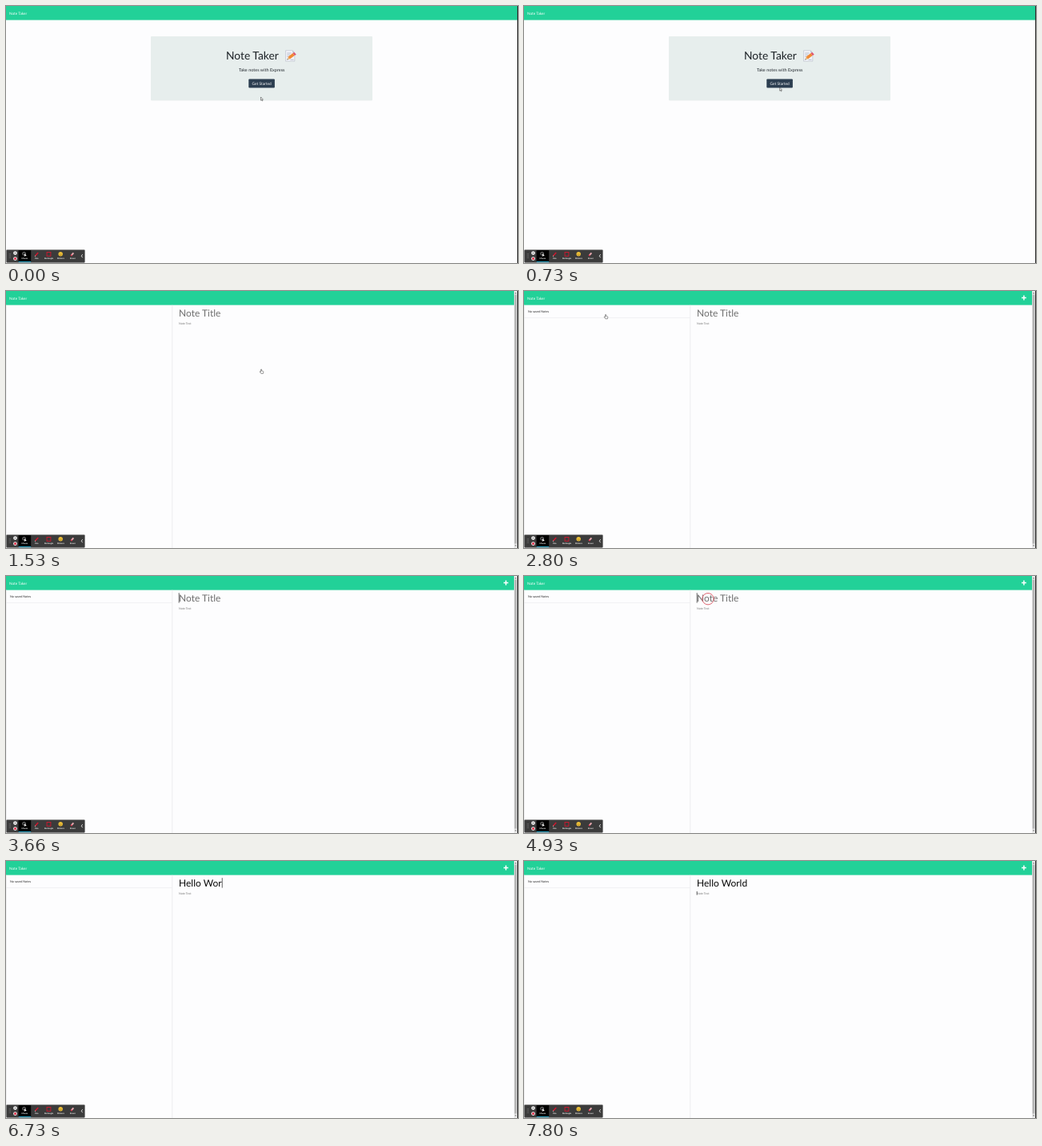
An HTML page for the animation above (8 s loop, 640 by 322 pixels).

```html
<!DOCTYPE html>
<html lang="en">
<head>
<meta charset="utf-8">
<title>Note Taker</title>
<style>
  html, body { margin: 0; width: 100%; height: 100%; overflow: hidden; background: #fdfdfe; }
  svg { display: block; width: 640px; height: 322px; }
  text { font-family: Lato, sans-serif; white-space: pre; text-rendering: geometricPrecision; }
  .mid { text-anchor: middle; }
  .tool { font-size: 2.5px; font-weight: 700; fill: #fff; text-anchor: middle; }
</style>
</head>
<body>
<svg viewBox="0 0 640 322" xmlns="http://www.w3.org/2000/svg">
  <rect width="640" height="322" fill="#fdfdfe"/>
  <rect width="640" height="17.6" fill="#22d198"/>
  <text x="4" y="10.6" font-size="4.65" fill="#fff">Note Taker</text>

  <g id="home">
    <rect x="181" y="38" width="277" height="80.4" rx="1" fill="#e7eeed"/>
    <text x="275" y="67" font-size="13.8" fill="#1c2126">Note Taker</text>
    <g id="memo">
      <path d="M349.6 55.8h8.6l2.6 2.6v10.8h-11.2z" fill="#f3f4fa" stroke="#a9afbd" stroke-width=".5"/>
      <path d="M358.2 55.8v2.6h2.6z" fill="#b9bfcd"/>
      <path d="M351.2 59h5.4M351.2 61.2h4M351.2 63.4h3M355.5 67.3h4" stroke="#8d97ad" stroke-width=".6"/>
      <path d="M351.4 67.4l1.2-3.6 2.2 2.6z" fill="#e9c48e"/>
      <path d="M352.6 63.8l5.9-4.7 2.3 2.8-6 4.5z" fill="#f08a35"/>
      <path d="M358.5 59.1l1.7-1.2 2.6 2.8-2 1.2z" fill="#e0506b"/>
      <path d="M351.4 67.4l.5-1.4.8.9z" fill="#333"/>
    </g>
    <text class="mid" x="319.7" y="81.8" font-size="5.5" fill="#23292f">Take notes with Express</text>
    <rect id="halo" x="302.6" y="90.8" width="34" height="12.4" rx="1.4" fill="#a3adb6"/>
    <rect id="btn" x="303.3" y="91.5" width="32.6" height="11" rx="1"/>
    <text class="mid" x="319.6" y="98.7" font-size="4.8" fill="#fff">Get Started</text>
  </g>

  <g id="notes">
    <path d="M207.8 17.6V322" stroke="#e6e8ea" stroke-width=".7"/>
    <path d="M.3 17.6V322" stroke="#dfe1e3" stroke-width=".6"/>
    <g id="list">
      <text x="5" y="27" font-size="3.75" fill="#222">No saved Notes</text>
      <path d="M0 33.6H207.6" stroke="#e9eaec" stroke-width=".6"/>
      <path d="M622 8.5h5.8M624.9 5.6v5.8" stroke="#fff" stroke-width="1.5"/>
    </g>
    <text id="title" x="216" y="31.8" font-size="12"></text>
    <text x="216" y="41.5" font-size="3.65" fill="#777">Note Text</text>
    <rect id="caret" width=".7" fill="#222"/>
    <circle id="ring" cx="230" cy="28.7" fill="none" stroke="#df6570" stroke-width="1"/>
    <rect x="635" width="4" height="322" fill="#e9e9e9"/>
    <rect x="635.6" y="4.6" width="2.8" height="312" fill="#b5b5b5"/>
    <path d="M636 3.2l1-1.4 1 1.4zM636 318.6l1 1.4 1-1.4z" fill="#555"/>
  </g>
  <rect x="639" width="1" height="322" fill="#2b2b2b"/>

  <g id="toolbar">
    <rect x=".5" y="305.6" width="98" height="15.8" rx=".8" fill="#3b3b3b" stroke="#777" stroke-width=".5"/>
    <path d="M4.2 310v6.6M5.4 310v6.6" stroke="#999" stroke-width=".6" stroke-dasharray=".7 1"/>
    <circle cx="11.5" cy="309.6" r="2.4" fill="#eee"/>
    <path d="M10.6 308.7l1.8 1.8M12.4 308.7l-1.8 1.8" stroke="#444" stroke-width=".5"/>
    <circle cx="11.5" cy="316.6" r="2.4" fill="#eee"/>
    <circle cx="11.5" cy="316.6" r="1.5" fill="#e0304a"/>
    <rect x="15.6" y="306" width="15.6" height="15" fill="#000"/>
    <rect x="15.6" y="320" width="15.6" height="1" fill="#2aa7c9"/>
    <circle cx="22.6" cy="310.3" r="1.9" fill="none" stroke="#ddd" stroke-width=".6"/>
    <path d="M22.6 309.8l3.2 3-1.4.1-1 1.2z" fill="#fff"/>
    <path d="M36.6 313l3.6-4" stroke="#d3172f" stroke-width="1.5"/>
    <path d="M35.9 313.9l.4-1.4.9.9z" fill="#eee"/>
    <rect x="51.1" y="308.5" width="4.8" height="4.8" fill="none" stroke="#d3172f" stroke-width=".9"/>
    <circle cx="68.2" cy="310.8" r="2.7" fill="#f3c53a"/>
    <path d="M66.7 311.4q1.5 1.7 3 0M67.2 309.6v.7M69.2 309.6v.7" fill="none" stroke="#6b4a10" stroke-width=".5"/>
    <path d="M81.7 312.4l2.7-3" stroke="#e8a9b0" stroke-width="2"/>
    <path d="M81.2 313l1-1.1" stroke="#d3344a" stroke-width="2"/>
    <path d="M95.7 311.2l-1.5 2 1.5 2" fill="none" stroke="#fff" stroke-width=".8"/>
    <text class="tool" x="23.4" y="317.4">Mouse</text>
    <text class="tool" x="38.4" y="317.4">Pen</text>
    <text class="tool" x="53.5" y="317.4">Rectangle</text>
    <text class="tool" x="68.4" y="317.4">Stickers</text>
    <text class="tool" x="83.4" y="317.4">Eraser</text>
  </g>

  <g id="pointer" stroke="#333" stroke-width=".5" stroke-linejoin="round" fill="#fff">
    <path id="arrow" d="M0-2v4.2l1-.8.7 1.6.7-.3-.7-1.5h1.2z"/>
    <path id="hand" d="M-.9-2.4q.6-.7 1 .1v1.7l1.6.4q.7.3.6 1l-.4 2h-2.6l-1.5-2q-.2-.8.5-.7l.8.6z"/>
  </g>
</svg>
<script>
const LOOP = 8000;
const $ = id => document.getElementById(id);
const show = (id, on) => $(id).setAttribute('display', on ? 'inline' : 'none');
const set = (id, attrs) => {
  for (const key in attrs) $(id).setAttribute(key, attrs[key]);
};

// [time, x, y]
const PATH = [
  [0, 318.5, 116], [60, 318.5, 116], [460, 319.5, 106], [600, 319.5, 106],
  [930, 319.8, 101], [1130, 319.8, 101], [1330, 319.5, 100.6], [2130, 319.5, 100.6],
  [2460, 105.5, 33], [2730, 105.5, 33], [2800, 102.5, 32], [3060, 102.5, 32],
  [3260, 209, 31], [3530, 209, 31]
];
const TYPED = 'Hello World';
const KEYS = [5730, 5860, 5930, 6060, 6200, 6330, 6460, 6530, 6660, 6800, 6930];
// spans in which the title caret is lit
const LIT = [[3530, 4060], [4530, 5460], [5730, 7400]];
const TAB = 7800;

function along(t) {
  const i = PATH.findIndex(p => p[0] > t);
  if (i < 0) return PATH[PATH.length - 1].slice(1);
  const [t0, x0, y0] = PATH[i - 1], [t1, x1, y1] = PATH[i];
  const k = (t - t0) / (t1 - t0);
  return [x0 + (x1 - x0) * k, y0 + (y1 - y0) * k];
}

function ringRadius(t) {
  if (t >= 3530 && t < 3660) return 7 + 12 * (t - 3530) / 130;
  if (t >= 4660 && t < 5060) return Math.min(7.2, 3 + (t - 4660) / 50);
  return 0;
}

function drawNotes(t) {
  show('list', t >= 1600);
  const count = KEYS.filter(k => t >= k).length;
  const title = $('title');
  const text = count ? TYPED.slice(0, count) : 'Note Title';
  if (title.textContent !== text) title.textContent = text;
  title.setAttribute('fill', count ? '#080808' : '#707070');

  const inText = t >= TAB;
  show('caret', inText || LIT.some(([a, b]) => t >= a && t < b));
  if (inText) set('caret', { x: 215.8, y: 38, height: 4.6 });
  else set('caret', { x: 215.8 + (count ? title.getComputedTextLength() + .4 : 0), y: 21.2, height: 12.4 });

  const r = ringRadius(t);
  show('ring', r > 0);
  set('ring', { r });
}

function draw(t) {
  const home = t < 1530;
  show('home', home);
  show('notes', !home);
  const [x, y] = along(t);
  const over = t > 930 || y < 102.5;
  set('btn', { fill: over ? '#17212c' : '#2c3e50' });
  show('halo', home && t >= 1330);
  drawNotes(t);
  show('pointer', t < 3530);
  set('pointer', { transform: `translate(${x} ${y})` });
  show('arrow', !over);
  show('hand', over);
}

const start = performance.now();
function tick() {
  draw((performance.now() - start) % LOOP);
  requestAnimationFrame(tick);
}
tick();
</script>
</body>
</html>
```
